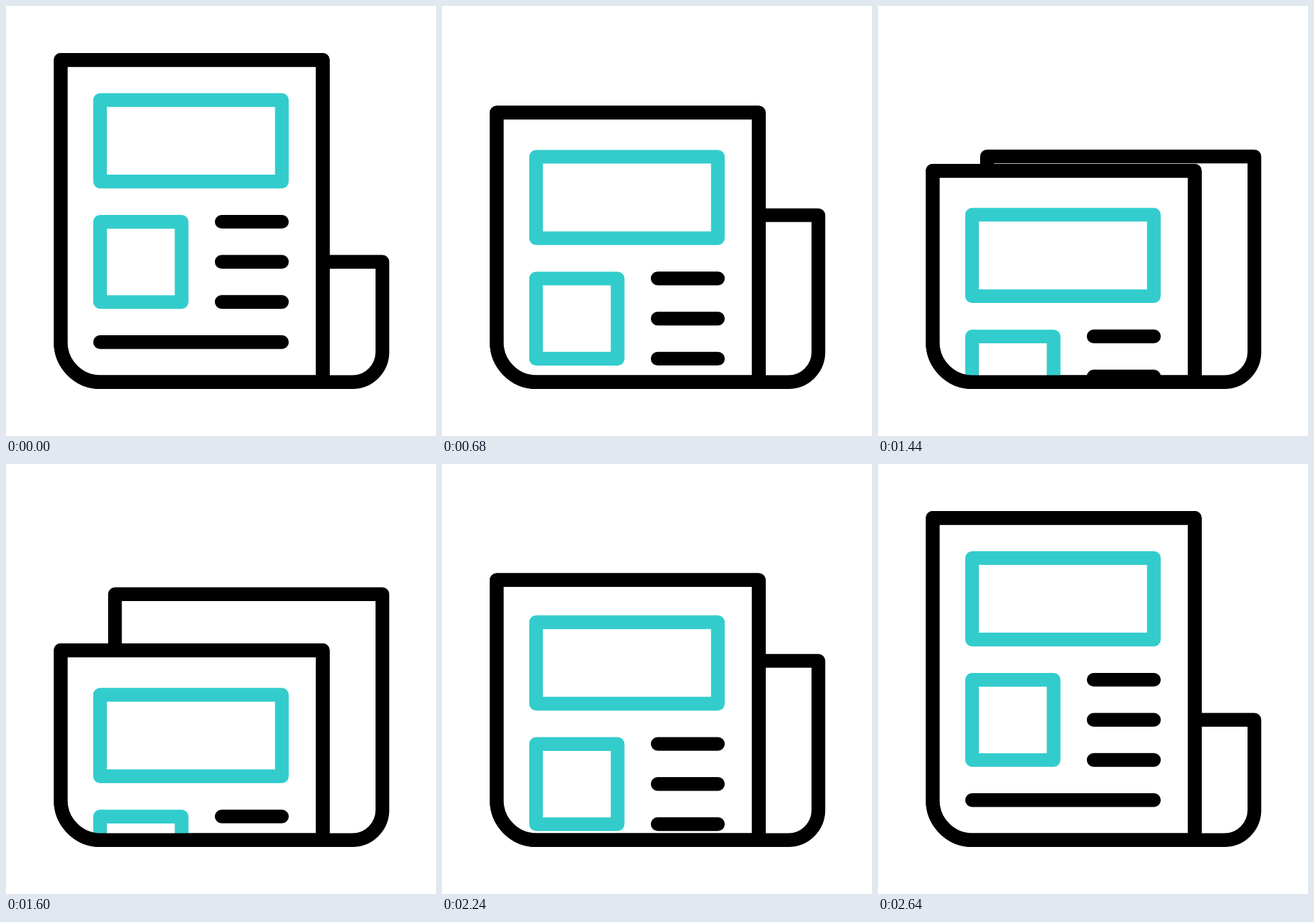
Animation of 640 by 640 pixels, one loop 3 s. Source, as an HTML page:

```html
<!DOCTYPE html>
<html lang="en">
<head>
<meta charset="utf-8">
<title>Newspaper</title>
<style>
  html, body { margin: 0; height: 100%; overflow: hidden; background: #fff; }
  svg { display: block; width: 100vw; height: 100vh; }
</style>
</head>
<body>
<svg viewBox="0 0 640 640" fill="#fff" stroke="#000" stroke-width="20.4" stroke-linecap="round" stroke-linejoin="round">
  <clipPath id="page"><rect x="81" width="390" height="560"/></clipPath>
  <path id="back"/>
  <path id="front"/>
  <g clip-path="url(#page)">
    <g id="content">
      <g stroke="#3cc">
        <rect x="140" y="140" width="270.6" height="121.2"/>
        <rect x="140" y="321.2" width="121.4" height="119.4"/>
      </g>
      <path d="M321 321.1h89.7M321 380.8h89.7M321 440.5h89.7M140 500.2h270.7"/>
    </g>
  </g>
  <path id="outline" fill="none"/>
</svg>
<script>
const LOOP = 3000, STEP = 40;
const el = id => document.getElementById(id);

// Offsets of [front page, its content, back page] reached by each move.
const moves = [
  { start: 120, end: 440, to: [72, 78.2, 62.7] },
  { start: 640, end: 1080, to: [131, 135.5, 124.6] },
  { start: 1333, end: 1600, to: [197, 203.5, 187] },
  { start: 1960, end: 2640, to: [0, 0, 0] }
];

// Cubic Bezier (1/6, 1/6, 2/3, 1): steady start, soft stop.
function ease(x) {
  const curve = (s, a, b) => 3 * s * (1 - s) ** 2 * a + 3 * s * s * (1 - s) * b + s ** 3;
  let low = 0, high = 1;
  for (let i = 0; i < 24; i++) {
    const mid = (low + high) / 2;
    if (curve(mid, 1 / 6, 2 / 3) < x) low = mid; else high = mid;
  }
  return curve(low, 1 / 6, 1);
}

function poseAt(time) {
  let pose = [0, 0, 0];
  for (const { start, end, to } of moves) {
    if (time <= start) break;
    const p = time >= end ? 1 : ease((time - start) / (end - start));
    pose = pose.map((v, i) => v + (to[i] - v) * p);
  }
  return pose;
}

function draw(now) {
  const time = Math.floor(now % LOOP / STEP) * STEP;
  const [front, content, back] = poseAt(time);
  const page = `M471.5 559.8V${80.2 + front}H81.3V500a59 59.8 0 0 0 59 59.8Z`;
  el('back').setAttribute('d', `M162.2 559.8V${380.8 - back}H560.2V515a44.8 44.8 0 0 1-44.8 44.8Z`);
  el('front').setAttribute('d', page);
  el('outline').setAttribute('d', page);
  el('content').setAttribute('transform', `translate(0 ${content})`);
  requestAnimationFrame(() => draw(performance.now()));
}
draw(performance.now());
</script>
</body>
</html>
```
